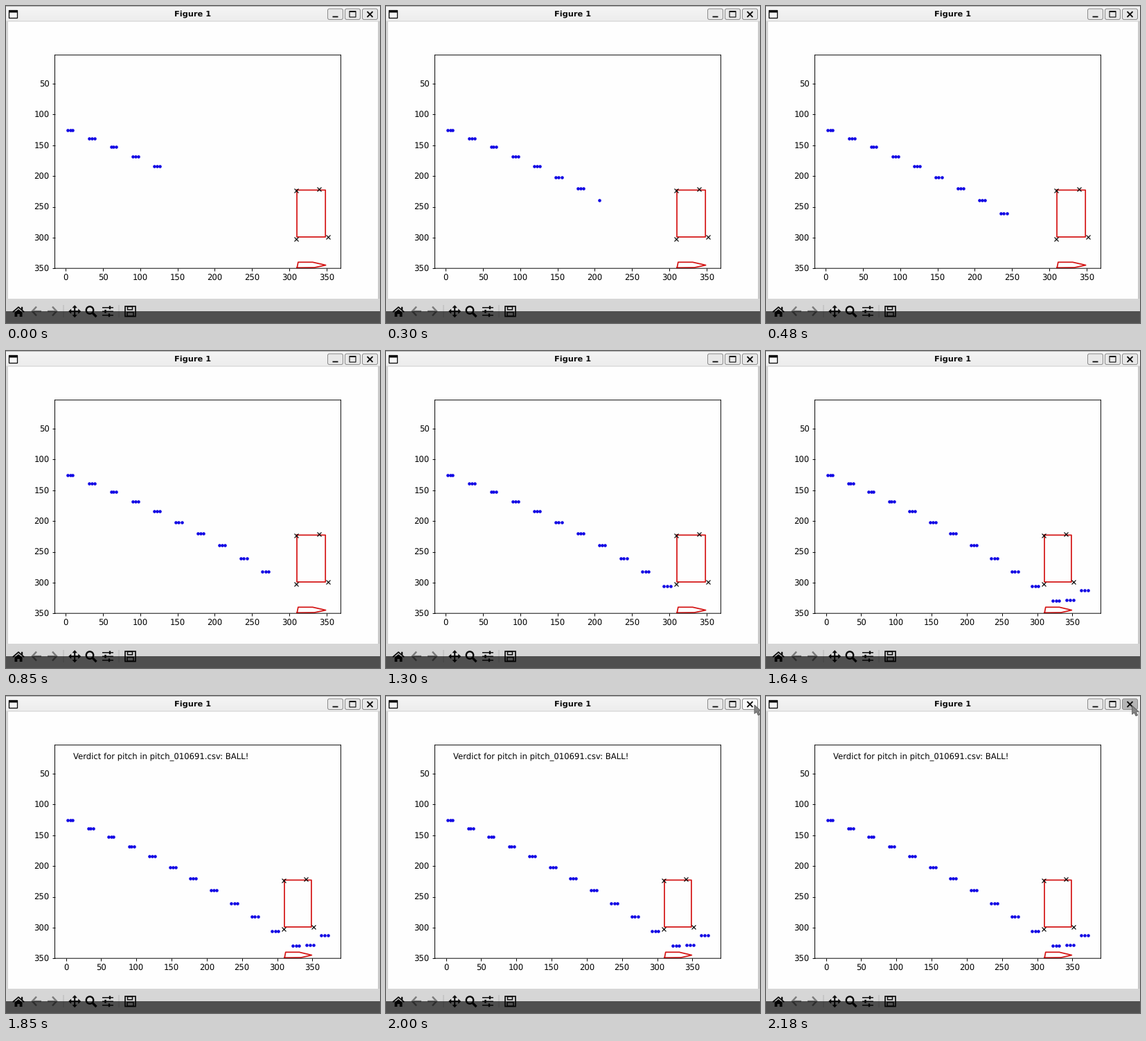
Animation of 540 by 457 pixels, one loop 2330 ms. Source, as a matplotlib script:

```python
import numpy as np
import matplotlib.pyplot as plt
from matplotlib.animation import FuncAnimation
from matplotlib.patches import Circle, FancyBboxPatch, Polygon, Rectangle

W, H, DPI = 540, 457, 64
STEP, LOOP = 10, 2330
LEFT, RIGHT, TOP, BOTTOM = 70.5, 483.4, 70.7, 378.2
RED, BLUE, INK, DIM = "#d41414", "#1208e4", "#0c0c0c", "#7a7a7a"


def px(n):
    """Pixels to points."""
    return n * 72 / DPI


plt.rcParams.update({
    "font.family": "DejaVu Sans", "font.size": px(11.6), "toolbar": "None",
    "text.hinting": "none", "path.snap": False, "axes.linewidth": px(0.95),
})
for axis in ("xtick", "ytick"):
    plt.rcParams.update({f"{axis}.major.size": px(4.05),
                         f"{axis}.major.pad": px(4.05),
                         f"{axis}.major.width": px(0.95)})

fig = plt.figure(figsize=(W / DPI, H / DPI), dpi=DPI, facecolor="#fefefe")
stage = fig.add_axes([0, 0, 1, 1])
stage.axis("off")


def rect(x0, y0, x1, y1, color, **kw):
    stage.add_patch(Rectangle((x0, y0), x1 - x0, y1 - y0, fc=color, lw=0,
                              **kw))


def frame(x0, y0, x1, y1, lw, fill="none"):
    stage.add_patch(Rectangle((x0, y0), x1 - x0, y1 - y0, fc=fill, ec=INK,
                              lw=px(lw), zorder=3))


def stroke(points, lw, color=INK):
    stage.plot(*zip(*points), color=color, lw=px(lw), zorder=3,
               solid_capstyle="butt", solid_joinstyle="miter")


def shape(points):
    stage.add_patch(Polygon(points, fc=INK, lw=0, zorder=3))


def draw_titlebar():
    shade = np.linspace(0.955, 0.925, 22)[:, None]
    stage.imshow(shade, cmap="gray", vmin=0, vmax=1, aspect="auto",
                 extent=(0, W, 22, 0), interpolation="nearest")
    rect(0, 0, W, 1, "#b0b0b0")
    rect(0, 21.5, W, 22.5, "#d0d0d0")
    frame(4.5, 6.5, 16.5, 17.5, 1.3, "#f6f6f6")
    rect(4, 6, 17, 9.5, INK, zorder=3)
    stage.text(270, 10.8, "Figure 1", size=px(11.4), weight="bold",
               ha="center", va="center_baseline", color=INK)

    buttons = [stage.add_patch(FancyBboxPatch(
        (x - 9, 6), 18, 11.5, boxstyle="round,pad=2,rounding_size=2.5",
        fc="#e8e8e8", ec="#8c8c8c", lw=px(1), zorder=2))
        for x in (475.5, 500.5, 525.5)]
    stroke([(471.5, 15.5), (479.5, 15.5)], 1.8)
    frame(496, 7.5, 505, 16, 1.1)
    stroke([(496, 8), (505, 8)], 1.8)
    for d in (4, -4):
        stroke([(525.5 - d, 8), (525.5 + d, 16)], 1.9)
    return buttons[-1]


def draw_toolbar():
    rect(0, 22, 3, H, "#d4d4d4")
    rect(537, 22, W, H, "#cacaca")
    rect(0, 422, W, H, "#d6d6d6")
    for x in (83, 163):
        stroke([(x, 431), (x, 449)], 0.9, "#b4b4b4")

    # home
    stroke([(9.8, 441.2), (18, 434.2), (26.2, 441.2)], 1.8)
    rect(22, 433.8, 24.2, 438, INK, zorder=3)
    shape([(12.5, 441.5), (18, 437), (23.5, 441.5), (23.5, 444),
           (12.5, 444)])
    for x in (12.5, 19.7):
        rect(x, 443.5, x + 3.8, 448, INK, zorder=3)

    # back and forward
    for x, d in ((37, 1), (74, -1)):
        stroke([(x, 440), (x + 14 * d, 440)], 2.4, DIM)
        stroke([(x + 7 * d, 433.5), (x + d, 440), (x + 7 * d, 446.5)],
               2.4, DIM)

    # pan
    cx, cy = 99.2, 440.2
    for dx, dy in ((1, 0), (-1, 0), (0, 1), (0, -1)):
        stroke([(cx, cy), (cx + 7 * dx, cy + 7 * dy)], 2.1)
        shape([(cx + 9 * dx, cy + 9 * dy),
               (cx + 5 * dx + 3.7 * dy, cy + 5 * dy + 3.7 * dx),
               (cx + 5 * dx - 3.7 * dy, cy + 5 * dy - 3.7 * dx)])

    # zoom
    stage.add_patch(Circle((121, 438.5), 5.2, fc="none", ec=INK, lw=px(2.4),
                           zorder=3))
    stroke([(124.8, 442.3), (130.5, 448)], 3.4)

    # sliders
    for y, knob in ((434.8, 150), (440.3, 143.5), (445.8, 149)):
        stroke([(139, y), (155, y)], 1.5)
        stroke([(knob, y - 2.4), (knob, y + 2.4)], 2.4)

    # save
    frame(172, 433, 187, 447.5, 1.7)
    frame(175.5, 433.5, 182.5, 437.8, 1.5)
    frame(175, 441.5, 184, 447, 1.5)

    rect(0, 440, W, H, "black", alpha=0.63, zorder=6)


close_button = draw_titlebar()
draw_toolbar()

ARROW = np.array([(0, 0), (0, 12.5), (3, 9.8), (5.4, 14.8), (7.8, 13.6),
                  (5.5, 9), (9.3, 8.6)])
cursor = stage.add_patch(Polygon(ARROW, fc="#848484", ec="#5c5c5c",
                                 lw=px(0.9), zorder=8))
stage.set_xlim(0, W)
stage.set_ylim(H, 0)

# Chart
plot = fig.add_axes([LEFT / W, 1 - BOTTOM / H, (RIGHT - LEFT) / W,
                     (BOTTOM - TOP) / H], facecolor="none")
plot.set_ylim(350, 3.3)
plot.set_xticks(range(0, 351, 50))
plot.set_yticks(range(50, 351, 50))

ZONE = [(310.3, 222.8), (348.6, 222.8), (348.6, 299), (310.3, 299)]
PLATE = [(310.5, 349), (312, 340), (331.5, 340), (349, 344.8), (334, 348.7)]
CORNERS = [(309.4, 223), (340.5, 221.4), (351.8, 299.3), (309.4, 302.1)]
for points in (ZONE, PLATE):
    plot.plot(*zip(*points, points[0]), color=RED, lw=px(1.73))
plot.plot(*zip(*CORNERS), "x", color="black", ms=px(6.9), mew=px(1.16))


def pitch(rows=14, bounce=11):
    """Fall along a parabola, then rise more slowly after the bounce."""
    k = np.arange(rows)
    fall, rise = np.minimum(k, bounce), np.maximum(k - bounce, 0)
    x = 5.9 + 29.15 * fall + 20.3 * rise
    y = 125.5 + 12.44 * fall + 0.556 * fall**2 + 6.4 * rise - 7.4 * rise**2
    gap = 3.2 + 0.12 * k
    return (x[:, None] + np.outer(gap, [-1, 0, 1])).ravel(), np.repeat(y, 3)


ball_x, ball_y = pitch()
# Bursts of new points: first time, last time, count
BURSTS = [(0, 0, 15), (60, 480, 12), (640, 820, 3), (1000, 1240, 3),
          (1330, 1610, 9)]
shown_at = np.concatenate([np.linspace(*burst) for burst in BURSTS])

balls, = plot.plot([], [], "o", color=BLUE, ms=px(4.6), mew=0)
verdict = plot.text(10, 25, "Verdict for pitch in pitch_010691.csv: BALL!")


def update(i):
    t = i * STEP
    n = np.count_nonzero(shown_at <= t)
    balls.set_data(ball_x[:n], ball_y[:n])
    lo, hi = ball_x[0], max(CORNERS[2][0], ball_x[:n].max())
    margin = 0.05 * (hi - lo)
    plot.set_xlim(lo - margin, hi + margin)

    verdict.set_visible(t >= 1730)
    keys = [1850, 2000, 2060, 2180]
    tip = (np.interp(t, keys, [542, 532, 532, 528.7]),
           np.interp(t, keys, [12, 13, 13, 14]))
    cursor.set_xy(ARROW + tip)
    hovered, pressed = t >= 1970, t >= 2090
    close_button.set_facecolor("#b6b6b6" if pressed else
                               "#fafafa" if hovered else "#e8e8e8")
    return balls, verdict, cursor, close_button


anim = FuncAnimation(fig, update, frames=LOOP // STEP, interval=STEP,
                     init_func=lambda: update(0), repeat=True, repeat_delay=0,
                     blit=False)
plt.show()
```
